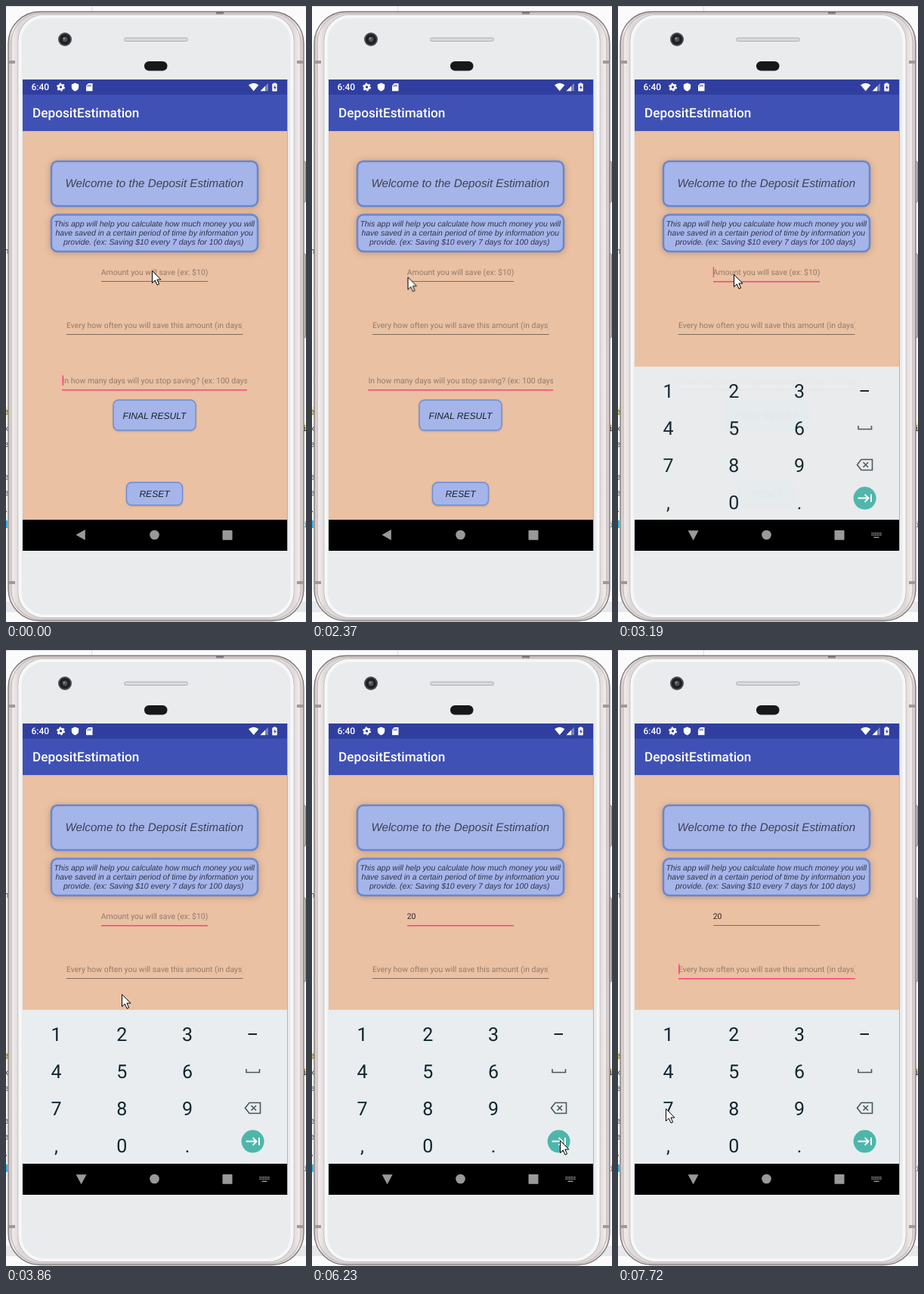
An HTML page that plays this animation: 397 by 813 pixels, repeating every 7.99 s.

```html
<!DOCTYPE html>
<html lang="en">
<head>
<meta charset="utf-8">
<title>Deposit Estimation</title>
<style>
html, body { margin: 0; width: 100%; height: 100%; overflow: hidden; background: #fbfbfb; }
svg { display: block; }
text { font-family: Roboto, "Noto Sans", sans-serif; text-rendering: geometricPrecision; }
.it { font-family: "Liberation Sans", Arial, sans-serif; font-style: italic; text-anchor: middle; }
.hint { font-size: 10.46px; fill: #937a69; }
.typed { font-size: 10.46px; fill: #2a2523; }
.key { font-size: 25px; fill: #10262f; text-anchor: middle; }
.code { font: 11px "Liberation Mono", monospace; fill: #333; }
.panel { fill: #a5b5e9; stroke: #6687d3; stroke-width: 2.5; filter: drop-shadow(0 1px 4px #6b401c55); }
.btn { fill: #a5b5e9; stroke: #6d8dd8; stroke-width: 1.4; filter: drop-shadow(0 1.5px 1px #6b401c44); }
.line { fill: #826b5d; }
.pink { fill: #f94a82; }

/* one loop lasts 7990 ms */
.a { animation: 7990ms step-end infinite; }
.caret3 { animation-name: caret3; }
.focus3 { animation-name: focus3; }
.focus1 { animation-name: focus1; }
.caret1 { animation-name: caret1; }
.focus2 { animation-name: focus2; }
.caret2 { animation-name: caret2; }
.hint1 { animation-name: hint1; }
.two { animation-name: two; }
.zero { animation-name: zero; }
.caretA { animation-name: caretA; }
.caretB { animation-name: caretB; }
.navUp { animation-name: navUp; }
.navIme { animation-name: navIme; }
.ime { animation-name: ime; }
.mouse { animation: mouse 7990ms linear infinite; }

@keyframes caret3 { 0%, 10%, 24.77% { opacity: 1 } 3.37%, 16.51%, 29.4%, 100% { opacity: 0 } }
@keyframes focus3 { 0% { opacity: 1 } 36.5%, 100% { opacity: 0 } }
@keyframes focus1 { 0%, 81%, 100% { opacity: 0 } 36.5% { opacity: 1 } }
@keyframes caret1 { 0%, 43.1%, 54.9%, 100% { opacity: 0 } 36.5%, 49.6% { opacity: 1 } }
@keyframes focus2 { 0% { opacity: 0 } 81%, 100% { opacity: 1 } }
@keyframes caret2 { 0%, 87.9% { opacity: 0 } 81%, 93.1%, 100% { opacity: 1 } }
@keyframes hint1 { 0% { opacity: 1 } 54.9%, 100% { opacity: 0 } }
@keyframes two { 0% { opacity: 0 } 54.9%, 100% { opacity: 1 } }
@keyframes zero { 0% { opacity: 0 } 69%, 100% { opacity: 1 } }
@keyframes caretA { 0%, 61.9%, 69%, 100% { opacity: 0 } 54.9%, 67.2% { opacity: 1 } }
@keyframes caretB { 0%, 74.3%, 100% { opacity: 0 } 69% { opacity: 1 } }
@keyframes navUp { 0% { opacity: 1 } 38.03%, 100% { opacity: 0 } }
@keyframes navIme { 0% { opacity: 0 } 38.03%, 100% { opacity: 1 } }
@keyframes ime {
  0%, 100% { opacity: 0; transform: translateY(1px) }
  39.8% { opacity: .97; transform: translateY(1px) }
  41.5%, 99.99% { opacity: 1; transform: none }
}
@keyframes mouse {
  0% { transform: translate(193px, 349px) }
  10% { transform: translate(193px, 349px); animation-timing-function: steps(6, start) }
  19.77% { transform: translate(94px, 357px); animation-timing-function: steps(2, start) }
  23.03% { transform: translate(100px, 361px) }
  24.77% { transform: translate(100px, 361px); animation-timing-function: steps(6, start) }
  34.86% { transform: translate(153px, 354px) }
  41.52% { transform: translate(153px, 354px); animation-timing-function: steps(6, start) }
  51.94% { transform: translate(153px, 504px) }
  55.78% { transform: translate(153px, 504px); animation-timing-function: steps(3, start) }
  61.9% { transform: translate(154px, 594px); animation-timing-function: steps(2, start) }
  65.45% { transform: translate(152px, 638px); animation-timing-function: steps(1, start) }
  67.25% { transform: translate(152px, 652px) }
  69.03% { transform: translate(152px, 652px); animation-timing-function: steps(5, start) }
  77.95% { transform: translate(328px, 647px) }
  84.46% { transform: translate(328px, 647px); animation-timing-function: steps(8, start) }
  98.36%, 100% { transform: translate(63px, 605px) }
}
</style>
</head>
<body>
<svg width="397" height="813" viewBox="0 0 397 813">
  <defs>
    <linearGradient id="rim" x1="0" x2="1" y1="0" y2="0">
      <stop offset="0" stop-color="#c9bfc0"/><stop offset=".015" stop-color="#f1ebeb"/>
      <stop offset=".035" stop-color="#dfd8d9"/><stop offset=".965" stop-color="#dfd8d9"/>
      <stop offset=".985" stop-color="#f1ebeb"/><stop offset="1" stop-color="#c9bfc0"/>
    </linearGradient>
  </defs>

  <!-- desktop behind the phone -->
  <rect width="397" height="813" fill="#fbfbfb"/>
  <path d="M0 .5H397M113.5 0V8" stroke="#dcdcdc"/>
  <rect y="786" width="397" height="14" fill="#e6e8ec"/>
  <g class="code">
    <text class="code" x="-3" y="327">n</text>
    <rect y="529" width="3" height="13" fill="#fff3a0"/><text class="code" x="-3" y="539">e</text>
    <text class="code" x="-3" y="561">x</text><text class="code" x="-3" y="582">e</text>
    <text class="code" x="-3" y="625">e</text><text class="code" x="-3" y="646">e</text>
    <text class="code" x="-3" y="668">.</text>
    <rect y="679" width="2" height="10" fill="#35b5e8"/>
    <rect x="394" y="550" width="3" height="13" fill="#fff3a0"/><text class="code" x="392" y="561">i</text>
    <text class="code" x="393" y="688" style="fill:#35a5d8">i</text>
  </g>

  <!-- phone body -->
  <g stroke="#8b8587" fill="#cfc8c9">
    <rect x="391" y="205" width="5.5" height="54" rx="2"/>
    <rect x="391" y="327" width="5.5" height="111" rx="2"/>
  </g>
  <rect x="3" y="7.5" width="391" height="804" rx="42" fill="url(#rim)" stroke="#7d7778" stroke-width="1.3"/>
  <rect x="7" y="9.5" width="383" height="800" rx="39" fill="none" stroke="#b9b1b2"/>
  <rect x="16" y="11.5" width="365" height="796" rx="34" fill="#e9ebec" stroke="#c2bcbd"/>
  <rect x="18.5" y="14" width="360" height="791" rx="32" fill="none" stroke="#f6f7f8" stroke-width="4"/>
  <path d="M4 74h8M385 74h8M4 761h8M385 761h8" stroke="#a0989a" stroke-width="4"/>
  <path d="M278 9h10" stroke="#7d7678" stroke-width="3"/>
  <circle cx="78" cy="44" r="9" fill="#4a4b4e"/>
  <circle cx="78" cy="44" r="7" fill="#1d1f22"/>
  <circle cx="78" cy="44" r="3.4" fill="#4c5359"/>
  <circle cx="77" cy="43" r="1.3" fill="#87919a"/>
  <rect x="156.5" y="42" width="84" height="4.5" rx="2.2" fill="#d9d9dc" stroke="#b0b0b4"/>
  <rect x="183" y="73" width="30.5" height="12.5" rx="6.2" fill="#17181a"/>

  <!-- status and app bars -->
  <rect x="22" y="97" width="350" height="622" fill="#eac1a3"/>
  <rect x="22" y="97" width="350" height="20" fill="#303f9f"/>
  <rect x="22" y="117" width="350" height="48" fill="#3f51b5"/>
  <rect x="22" y="165" width="350" height="1" fill="#dcb6a0"/>
  <path d="M372.5 97v622" stroke="#b5b5b8"/>
  <g fill="#fff">
    <text x="33.5" y="111.3" font-size="12" font-weight="500">6:40</text>
    <text x="35" y="147.3" font-size="17.2" font-weight="500">DepositEstimation</text>
    <circle cx="72.5" cy="107" r="3" fill="none" stroke="#fff" stroke-width="2.6"/>
    <circle cx="72.5" cy="107" r="4.7" fill="none" stroke="#fff" stroke-width="1.6" stroke-dasharray="2.4 2.52"/>
    <path d="M91.5 101.5l4.7 2v3.4q0 3.7-4.7 5.6q-4.7-1.9-4.7-5.6v-3.4z"/>
    <path d="M109 102h5.5v10.2h-8.5v-7.2z"/>
    <path d="M321 104.2q6.7-5 13.4 0l-6.7 8z"/>
    <path d="M347 101.8v10.4h-10.4z" opacity=".35"/>
    <path d="M343 105.8v6.4h-6.4z"/>
    <path d="M354 101.5h3v1h1.7v10h-6.4v-10h1.7z"/>
  </g>
  <path d="M107.9 104.5v2m2-2.8v2.8m2-2.8v2.8" stroke="#303f9f"/>
  <path d="M356.3 104.2l-2.3 3.8h1.5v3l2.2-4h-1.4z" fill="#303f9f"/>

  <!-- page -->
  <rect class="panel" x="60" y="205" width="273" height="59" rx="8"/>
  <rect class="panel" x="60" y="275.5" width="273" height="48.5" rx="8"/>
  <text class="it" x="196.3" y="239.3" font-size="15.17" fill="#3d4155">Welcome to the Deposit Estimation</text>
  <g font-size="10.45" fill="#30344a">
    <text class="it" x="196.3" y="291.3">This app will help you calculate how much money you will</text>
    <text class="it" x="196.3" y="302.9">have saved in a certain period of time by information you</text>
    <text class="it" x="195.3" y="314.5">provide. (ex: Saving $10 every 7 days for 100 days)</text>
  </g>

  <text class="hint a hint1" x="125.7" y="355">Amount you will save (ex: $10)</text>
  <text class="typed a two" x="125.7" y="355">2</text>
  <text class="typed a zero" x="131.6" y="355">0</text>
  <rect class="line" x="126" y="363" width="141" height="1"/>
  <rect class="pink a focus1" x="126" y="363" width="141" height="1.6"/>
  <rect class="pink a caret1" x="125.7" y="344.5" width="1.5" height="13.5"/>
  <rect class="pink a caretA" x="131.5" y="344.5" width="1.5" height="13.5"/>
  <rect class="pink a caretB" x="137.5" y="344.5" width="1.5" height="13.5"/>

  <svg x="80" y="410" width="233.5" height="20"><text class="hint" x="0" y="15">Every how often you will save this amount (in days)</text></svg>
  <rect class="line" x="80" y="433" width="233.5" height="1"/>
  <rect class="pink a focus2" x="80" y="433" width="233.5" height="1.6"/>
  <rect class="pink a caret2" x="80" y="414.5" width="1.5" height="13.5"/>

  <svg x="74" y="483" width="245" height="20"><text class="hint" x=".5" y="15">In how many days will you stop saving? (ex: 100 days)</text></svg>
  <rect class="line" x="74" y="506" width="245" height="1"/>
  <rect class="pink a focus3" x="74" y="506" width="245" height="1.6"/>
  <rect class="pink a caret3" x="74.5" y="487.5" width="1.5" height="13.5"/>

  <rect class="btn" x="142" y="520" width="109" height="40" rx="7"/>
  <rect class="btn" x="159.5" y="628.7" width="74" height="30" rx="7"/>
  <g font-size="12.05" fill="#1c1f2c">
    <text class="it" x="196.5" y="544.5">FINAL RESULT</text>
    <text class="it" x="196.5" y="648">RESET</text>
  </g>

  <!-- number pad -->
  <g class="a ime">
    <rect x="22" y="475" width="350" height="204" fill="#e9edef"/>
    <g class="key">
      <text x="66.5" y="515.5">1</text><text x="153.2" y="515.5">2</text><text x="240" y="515.5">3</text>
      <text x="66.5" y="564.5">4</text><text x="153.2" y="564.5">5</text><text x="240" y="564.5">6</text>
      <text x="66.5" y="613.5">7</text><text x="153.2" y="613.5">8</text><text x="240" y="613.5">9</text>
      <text x="66.5" y="662.5">,</text><text x="153.2" y="662.5">0</text><text x="240" y="662.5">.</text>
      <rect x="320.5" y="506" width="11.5" height="2"/>
    </g>
    <g fill="none" stroke="#47575f" stroke-width="1.6">
      <path d="M318 553v4.5h17.5v-4.5"/>
      <path d="M316.5 604.5l5.5-7h14.5v14h-14.5zM324.5 601.3l6.5 6.5m0-6.5l-6.5 6.5"/>
    </g>
    <circle cx="326.6" cy="648.6" r="15" fill="#4db6ac"/>
    <path d="M317.5 648.6h14m-5-5l5 5l-5 5m8.5-10v10" fill="none" stroke="#fff" stroke-width="2"/>
  </g>

  <!-- navigation bar -->
  <rect x="22" y="678" width="350" height="41" fill="#000"/>
  <g fill="#999">
    <path class="a navUp" d="M92.5 698l12.3-7v14z"/>
    <g class="a navIme">
      <path d="M92.6 692.3h14l-7 13z"/>
      <path d="M335.5 695.8h13M335.5 698.3h13" stroke="#999" stroke-width="1.4" stroke-dasharray="1.5 .8"/>
      <path d="M338.5 701.3h7" stroke="#999" stroke-width="1.4"/>
    </g>
    <circle cx="196.5" cy="698" r="6.3"/>
    <rect x="286.5" y="692" width="13" height="12.7" rx=".8"/>
  </g>

  <path class="mouse" d="M.5 .5v16.2l3.8-3.6l2.7 6.1l2.6-1.1l-2.7-6h5z" fill="#fff" stroke="#000" stroke-linejoin="round"/>
</svg>
</body>
</html>
```
